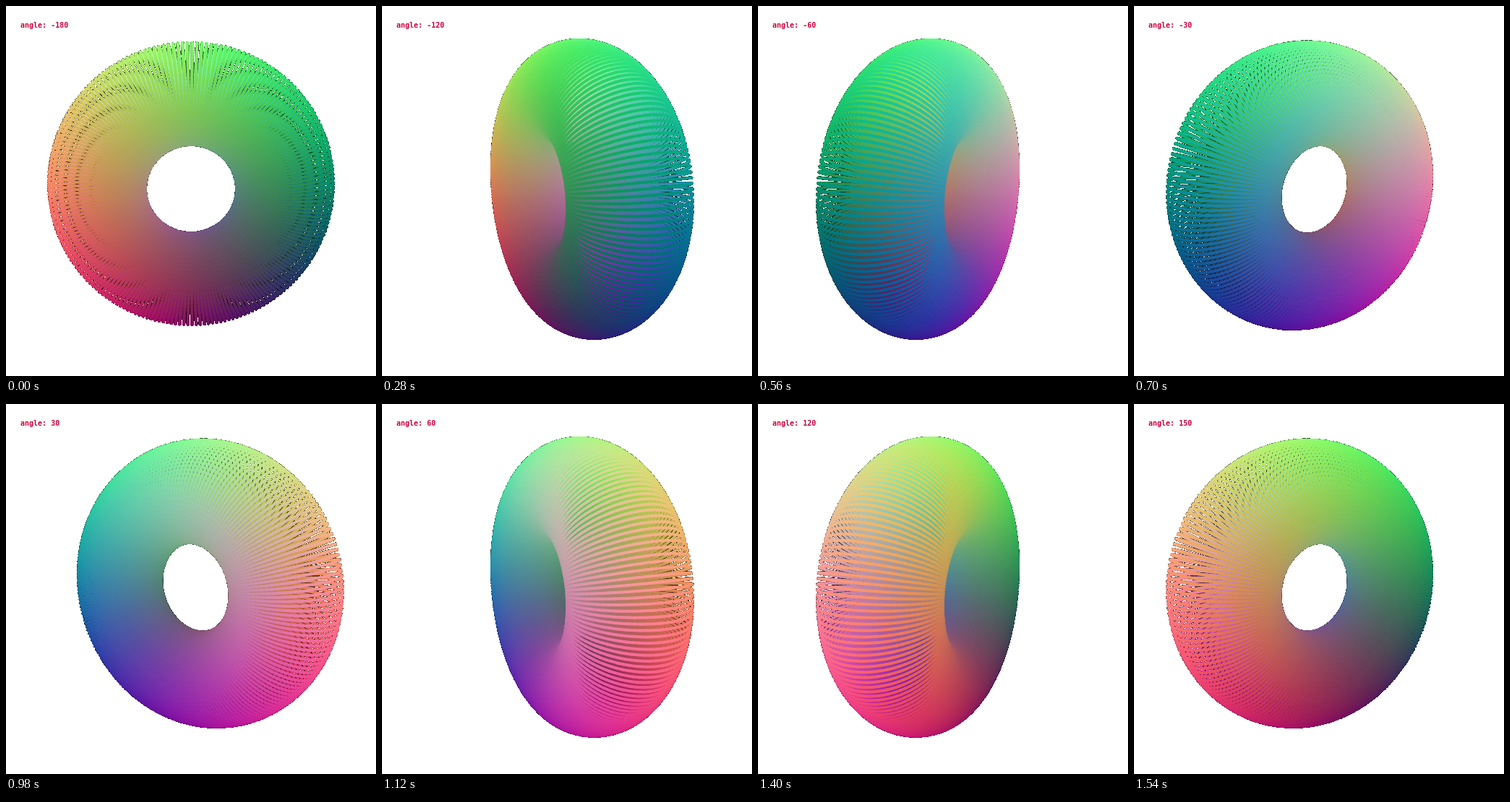
Recreate the animation shown at these times as an HTML page with a canvas. Size 512 px wide and 512 px high, loop 1680 ms.

```html
<!DOCTYPE html>
<html lang="en">
<head>
<meta charset="utf-8">
<title>Rotating ring torus</title>
<style>
  html, body { margin: 0; width: 100%; height: 100%; overflow: hidden; background: #fff; }
  canvas { display: block; }
</style>
</head>
<body>
<canvas id="stage" width="512" height="512"></canvas>
<script>
const SIZE = 512, STEPS = 12, STEP_MS = 140;
const RINGS = 199, SEGMENTS = 72, TUBE = 0.5, STRAND = 4;
const FOCAL = 450, DISTANCE = 3.54, TILT = 10 * Math.PI / 180;
const MIN_ALPHA = 40;
const TAU = 2 * Math.PI;

const ctx = document.getElementById('stage').getContext('2d');
const poses = [];

function torusPoint(ring, segment) {
  const u = TAU * ring / RINGS, v = TAU * segment / SEGMENTS;
  const radius = 1 + TUBE * Math.cos(v);
  return [radius * Math.cos(u), radius * Math.sin(u), TUBE * Math.sin(v)];
}

function project([x, y, z], turn) {
  const side = x * Math.cos(turn) - z * Math.sin(turn);
  const near = x * Math.sin(turn) + z * Math.cos(turn);
  const up = y * Math.cos(TILT) - near * Math.sin(TILT);
  const depth = near * Math.cos(TILT) + y * Math.sin(TILT);
  const scale = FOCAL / (DISTANCE - depth);
  return { x: SIZE / 2 + side * scale, y: SIZE / 2 - up * scale, depth };
}

// Position in the torus' own space gives red, green and blue.
function colorAt(point) {
  const channel = p => Math.round(127.5 * (1 + p / (1 + TUBE)));
  return `rgb(${point.map(channel).join()})`;
}

function drawTorus(g, turn) {
  const pieces = [];
  for (let ring = 0; ring < RINGS; ring++) {
    let from = project(torusPoint(ring, 0), turn);
    for (let s = 0; s < SEGMENTS; s++) {
      const to = project(torusPoint(ring, s + 1), turn);
      pieces.push({
        from, to,
        depth: from.depth + to.depth,
        color: colorAt(torusPoint(ring, s + 0.5))
      });
      from = to;
    }
  }

  pieces.sort((a, b) => a.depth - b.depth);
  g.lineCap = 'round';
  g.lineWidth = STRAND;
  for (const { from, to, color } of pieces) {
    g.strokeStyle = color;
    g.beginPath();
    g.moveTo(from.x, from.y);
    g.lineTo(to.x, to.y);
    g.stroke();
  }
}

// Soft edges fade to black and end hard against the white ground.
function darkenEdges(g) {
  const image = g.getImageData(0, 0, SIZE, SIZE);
  const px = image.data;
  for (let i = 0; i < px.length; i += 4) {
    const alpha = px[i + 3];
    for (let c = i; c < i + 3; c++) {
      px[c] = alpha < MIN_ALPHA ? 255 : px[c] * alpha / 255;
    }
    px[i + 3] = 255;
  }
  g.putImageData(image, 0, 0);
}

function renderPose(step) {
  const canvas = document.createElement('canvas');
  canvas.width = canvas.height = SIZE;
  const g = canvas.getContext('2d', { willReadFrequently: true });
  const angle = -180 + step * 360 / STEPS;
  drawTorus(g, angle * Math.PI / 180);
  darkenEdges(g);
  g.fillStyle = '#cc003c';
  g.font = 'bold 10px "DejaVu Sans Mono", monospace';
  g.fillText(`angle: ${angle}`, 20, 29.5);
  return canvas;
}

let shown = -1;
function tick() {
  const step = Math.floor(performance.now() / STEP_MS) % STEPS;
  if (step !== shown) {
    poses[step] ??= renderPose(step);
    ctx.drawImage(poses[step], 0, 0);
    shown = step;
  }
  requestAnimationFrame(tick);
}
tick();
</script>
</body>
</html>
```
